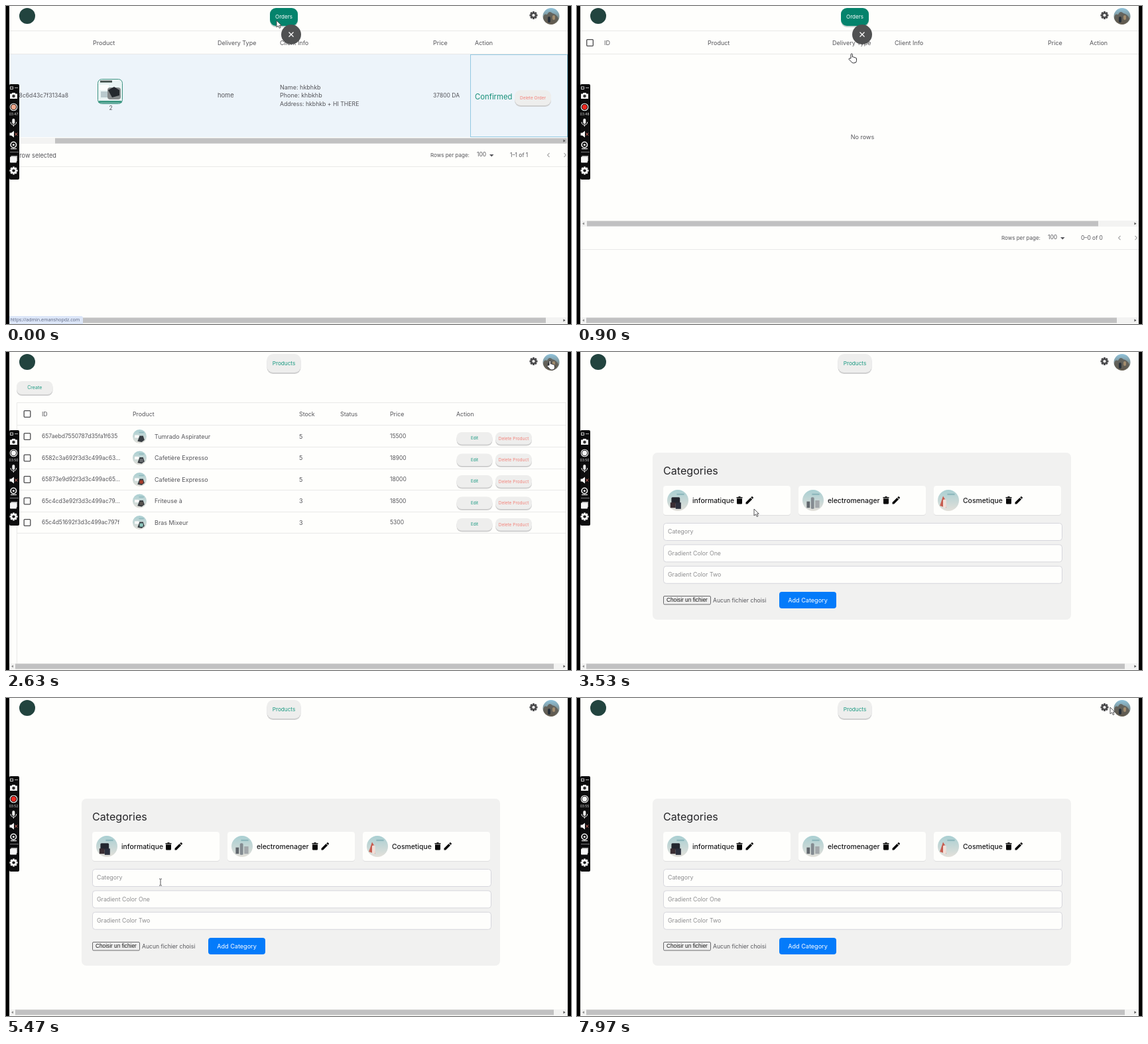
An HTML page that plays this animation: 852x480 px, repeating every 8 s.

```html
<!DOCTYPE html>
<html lang="en">
<head>
<meta charset="utf-8">
<title>Shop admin</title>
<style>
  html, body { margin: 0; width: 100%; height: 100%; overflow: hidden; background: #fefefc; }
  svg { display: block; width: 852px; height: 480px; font-family: Inter, sans-serif; }
</style>
</head>
<body>
<svg id="stage" viewBox="0 0 852 480"></svg>
<script>
const LOOP = 8000;
const PAPER = '#fefefc', INK = '#55555a', LINE = '#e9e9e8', TEAL = '#1c9a82', ROSE = '#f3827a';
const stage = document.getElementById('stage');

// Drawing helpers; text is placed by its vertical middle.
const rect = (x, y, w, h, fill, r = 0, extra = '') =>
  `<rect x="${x}" y="${y}" width="${w}" height="${h}" rx="${r}" fill="${fill}" ${extra}/>`;
const circle = (x, y, r, fill, extra = '') =>
  `<circle cx="${x}" cy="${y}" r="${r}" fill="${fill}" ${extra}/>`;
const path = (d, fill, extra = '') => `<path d="${d}" fill="${fill}" ${extra}/>`;
const stroke = (d, color, width = 1) =>
  path(d, 'none', `stroke="${color}" stroke-width="${width}"`);
const text = (x, y, label, size = 9, fill = INK, extra = '') =>
  `<text x="${x}" y="${y + size * 0.35}" font-size="${size}" fill="${fill}" ${extra}>${label}</text>`;
const centered = (x, y, label, size, fill) => text(x, y, label, size, fill, 'text-anchor="middle"');
const group = (id, body) => `<g id="${id}">${body}</g>`;
const at = (x, y, body) => `<g transform="translate(${x} ${y})">${body}</g>`;
const hLine = (x1, x2, y, color = LINE) => stroke(`M${x1} ${y + 0.5}H${x2}`, color);

const checkbox = (x, y) => rect(x - 4.8, y - 4.8, 9.6, 9.6, 'none', 1, 'stroke="#4a4a4c" stroke-width="1.3"');

function softButton(x, y, w, h, label, size, color, r = 8) {
  return rect(x, y + 2, w, h, '#cfcfcf', r) + rect(x, y, w, h, '#eeeeed', r) +
    centered(x + w / 2, y + h / 2, label, size, color);
}

function gear(x, y, r, fill, hole) {
  let teeth = '';
  for (let i = 0; i < 4; i++)
    teeth += rect(-r, -r * 0.24, r * 2, r * 0.48, fill, 0.5, `transform="rotate(${i * 45})"`);
  return at(x, y, teeth + circle(0, 0, r * 0.75, fill) + circle(0, 0, r * 0.35, hole));
}

// A small round picture: pale backdrop with a caption, and its shapes on a 20-unit disc.
const thumb = (x, y, r, shapes) => at(x, y, `<g transform="scale(${r / 10})">` +
  circle(0, 0, 10, 'url(#pale)') + rect(-1, -6.5, 7, 1.5, '#8fb9bd') + shapes + '</g>');

function scrollbar(y, x1, x2, h = 9) {
  return rect(5, y, 842, h, '#f3f3f2') + rect(x1, y + 0.5, x2 - x1, h - 1, '#c1c1c2') +
    path(`M8 ${y + h / 2}l3 -2v4z`, '#8d8d8d') + path(`M843.500 ${y + h / 2}l-3 -2v4z`, '#505050');
}

function pagination(y, range, lineY) {
  return text(640, y, 'Rows per page:', 8) + text(710, y - 0.5, '100', 8.5) +
    path(`M729 ${y - 1}h6.500l-3.250 3.500z`, INK) + text(760, y, range, 8.4) +
    stroke(`M819.500 ${y - 3}l-3 3l3 3M841.500 ${y - 3}l3 3l-3 3`, '#a9a9a9', 1.1) +
    hLine(5, 847, lineY);
}

function orderHeads(shift) {
  const heads = [['Product', 197], ['Delivery Type', 385], ['Client Info', 479], ['Price', 710], ['Action', 773]];
  return hLine(5, 847, 37) + hLine(5, 847, 72) +
    heads.map(([label, x]) => text(x - shift, 56, label)).join('');
}

const speedDial = rect(398, 5, 42, 27, '#c4d2cf', 9) + rect(398, 3, 42, 27, '#04836c', 9) +
  centered(419, 16.5, 'Orders', 8, '#fff') + circle(430, 43, 15, '#505152') +
  stroke('M426.500 39.500l7 7m0 -7l-7 7', '#fff', 1.3);

function orderPage() {
  const product = rect(138.5, 110.5, 37, 37, '#e9f3f3', 6, 'stroke="#3f9484"') +
    rect(142, 112.5, 18, 3, '#44504d') + rect(140, 119, 15, 8, '#fcfcfc') +
    rect(153, 123, 20, 18, '#85898a', 4) + path('M154 127L163 122L171 127V135L160 138Z', '#25292e') +
    rect(143, 129, 10, 9, '#b9c9cd') + rect(139, 143, 36, 3.5, '#3f9a85', 2);
  return rect(5, 73, 842, 125, '#edf4fa') + orderHeads(66) +
    text(94, 135, '8c6d43c7f3134a8', 8.6, INK, 'text-anchor="end"') + product +
    centered(158, 154, '2', 8.5, INK) + text(319, 135, 'home', 9.3) +
    text(413, 122.5, 'Name: hkbhkb') + text(413, 135, 'Phone: khbkhb') +
    text(413, 148, 'Address: hkbhkb + HI THERE', 8.7) + text(644, 135, '37800 DA', 8.5) +
    rect(700.5, 73.5, 146, 124, 'none', 0, 'stroke="#93c9e2"') +
    text(707, 137, 'Confirmed', 11.3, '#168f79') +
    softButton(767, 127, 55, 23, 'Delete Order', 6.5, ROSE, 9) +
    scrollbar(199, 74, 846) + text(76, 225.5, '1 row selected', 9.2, INK, 'text-anchor="end"') +
    pagination(225, '1–1 of 1', 242) + speedDial + scrollbar(470, 14, 814) +
    path('M5 468H113Q116 468 116 471V480H5Z', '#dce6f8') +
    text(6.5, 474, 'https://admin.emanshopdz.com', 7, '#59627c', 'font-family="Open Sans, sans-serif"');
}

function emptyPage() {
  return orderHeads(0) + checkbox(19.5, 55.5) + text(41, 56, 'ID') + centered(430.5, 198, 'No rows', 9, INK) +
    scrollbar(324, 15, 786) + pagination(350, '0–0 of 0', 367) + speedDial + scrollbar(470, 14, 814);
}

const productsTab = softButton(393.5, 3, 51, 28, 'Products', 8.2, TEAL, 9);

function productPage() {
  const heads = [['ID', 54], ['Product', 191], ['Stock', 442], ['Status', 504], ['Price', 579], ['Action', 679]];
  const rows = [
    ['657aebd7550787d35fa1f635', 'Tumrado Aspirateur', 5, 15500, '#3a3f45'],
    ['6582c3a692f3d3c499ac63…', 'Cafetière Expresso', 5, 18900, '#686d70'],
    ['65873e9d92f3d3c499ac65…', 'Cafetière Expresso', 5, 18000, '#a83d2b'],
    ['65c4cd3e92f3d3c499ac79…', 'Friteuse à', 3, 18500, '#57534f'],
    ['65c4d51692f3d3c499ac797f', 'Bras Mixeur', 3, 5300, '#8cc6bc']
  ];
  const body = rows.map(([id, name, stock, price, accent], i) => {
    const y = 127.5 + i * 32.5;
    const picture = rect(-7, -2, 6, 4, '#fafafa') + path('M-3 7L0 -1H5L7 5L3 8Z', '#383d42') + rect(0, 1, 5, 5, accent, 1);
    return checkbox(32, y) + text(54, y, id, 8.5) + thumb(201.5, y, 10.5, picture) +
      text(224, y, name) + text(442, y, stock) + text(579, y, price, 8.5) +
      softButton(679.5, y - 6.5, 54, 18.5, 'Edit', 6.3, TEAL) +
      softButton(738, y - 6.5, 55, 18.5, 'Delete Product', 6.5, ROSE) +
      hLine(17, 844, Math.round(y + 15.6));
  }).join('');
  return productsTab + softButton(16, 44, 54.5, 20, 'Create', 7, TEAL) +
    stroke('M16.500 470V76.500H844.500V470', LINE) + hLine(17, 844, 110) + checkbox(32, 93.5) +
    heads.map(([label, x]) => text(x, 94, label, 8.8)).join('') +
    group('productRows', body) + scrollbar(470, 14, 826);
}

const trash = (x, y) => path(`M${x - 4.5} ${y - 5}h2.500l1 -1h2l1 1h2.500v1.500h-9zM${x - 4} ${y - 2.8}h8v7q0 1.300 -1.300 1.300h-5.400q-1.300 0 -1.300 -1.300z`, '#080808');
const pencil = (x, y) => path(`M${x - 5.5} ${y + 5.5}v-2.600l7 -7l2.600 2.600l-7 7zM${x + 2.2} ${y - 4.6}l1.200 -1.200q.6 -.5 1.200 0l1.200 1.200q.5 .6 0 1.200l-1.200 1.200z`, '#080808');

function categoryPage() {
  const computer = rect(-6, -3, 8, 6, '#23262f', 1) + rect(-7, 2, 5, 5, '#3a2e33') + rect(-2, 2, 5, 6, '#2b303d');
  const appliances = rect(-6, 1, 3, 6, '#60666c') + rect(-2, -3, 3, 11, '#848b91', 1) + rect(2, 0, 4, 7, '#a3a8ab');
  const makeup = path('M-8 5L-5 -4L-3 -1L-2 7Z', '#c75d50') + rect(-5, -1, 3, 8, '#f1dfd8', 1);
  const cards = [['informatique', 130, 245, computer], ['electromenager', 334, 466, appliances], ['Cosmetique', 538, 651, makeup]];
  const fields = ['Category', 'Gradient Color One', 'Gradient Color Two'];
  return productsTab + rect(114, 152, 631, 252, '#f1f1f0', 7) + text(130, 179, 'Categories', 16.1, '#252528') +
    cards.map(([label, x, icon, picture]) =>
      rect(x, 203, 192, 44, '#dededf', 4) + rect(x, 202, 192, 44, PAPER, 4) +
      thumb(x + 22, 224, 16, picture) +
      text(x + 44, 224, label, 10.4, '#19191b', 'font-weight="500"') +
      trash(icon, 224) + pencil(icon + 15, 224)).join('') +
    fields.map((label, i) => {
      const y = 258.5 + i * 32.4;
      return rect(130.5, y, 601, 26, PAPER, 4, 'stroke="#d6d6dc"') + text(137, y + 12.7, label, 8.8, '#8e8e90');
    }).join('') +
    rect(130.5, 368.5, 71, 12.5, '#efefef', 1.5, 'stroke="#6a6a6c"') +
    text(135, 374.5, 'Choisir un fichier', 8.3, '#161616', 'font-family="Liberation Sans, sans-serif"') +
    text(205, 374.5, 'Aucun fichier choisi', 8.6) +
    rect(305, 362, 86, 25, '#047bfa', 4) + centered(348, 374.5, 'Add Category', 9.1, '#fff') +
    scrollbar(470, 14, 826);
}

function recorder() {
  const white = '#f6f6f6';
  return rect(5, 118, 15, 144, '#0d0d0e', 2) + rect(6.5, 122, 4, 3.5, 'none', 0, `stroke="${white}" stroke-width=".8"`) +
    stroke('M13 123.500h5', '#aaa', 1) +
    path('M6 132.500h2.500l1 -1.500h4l1 1.500h2.500v7.500h-11z', white) + circle(11.5, 136, 2.3, '#333') +
    circle(11.5, 152.5, 5.3, 'none', `stroke="${white}" stroke-width="1.1"`) + circle(11.5, 152.5, 3.7, white, 'id="recordDot"') +
    `<text id="timer" x="11.500" y="165.200" font-size="5" fill="#dcdcdc" text-anchor="middle"></text>` +
    rect(9.3, 170, 4, 8, white, 2) + stroke('M7 175q0 4.500 4.300 4.500t4.300 -4.500M11.300 179v3', white) +
    path('M5.500 191.500h2.500l4 -3v10l-4 -3h-2.500z', white) + stroke('M13.500 191.500l3.500 4m0 -4l-3.500 4', '#e0776d', 1) +
    circle(11.3, 209.5, 4.2, 'none', `stroke="${white}" stroke-width="1.600"`) + circle(11.3, 209.5, 1.6, white) + stroke('M7 215.500h9', white, 1.2) +
    hLine(6, 19, 220, '#77777a') + rect(7.5, 226, 9.5, 8, '#aaa') + rect(6, 227.5, 10, 9, white, 1) +
    gear(11.5, 248.5, 6, white, '#0d0d0e');
}

const avatar = circle(822, 15.5, 12.5, 'url(#sky)') +
  path('M810 18Q811 11 816 13Q819 6 824 11Q830 12 833 19Q831 25 824 27.500Q812 27 810 18Z', '#5c554b', 'opacity=".8"') +
  rect(817, 16, 4, 9, '#28313a', 2) + rect(824, 14, 4, 7, '#a28c6d', 2);

const cursors = group('arrow', path('M0 0V10L2.500 7.800L4.300 11.500L6 10.700L4.300 7.200H7.300Z', '#fff', 'stroke="#424245" stroke-width=".9"')) +
  group('hand', path('M2 7V1.500Q2 0 3.200 0T4.400 1.500V5Q6 4.300 6.800 5.600Q8.300 5 9 6.300Q10.500 6 10.500 8V10.500Q10.500 14 7 14H5.500Q3.500 14 2.500 12L-1 8.500Q-1 6.500 1 7Z', '#fff', 'stroke="#303033" stroke-width="1"')) +
  group('beam', stroke('M-2 -5h1.500l.5 .5l.5 -.5h1.500M0 -4.500v9M-2 5h1.500l.5 -.5l.5 .5h1.500', '#555558'));

stage.innerHTML = `<defs>
    <linearGradient id="pale" x2="0" y2="1"><stop stop-color="#a9cfd2"/><stop offset="1" stop-color="#e3e0da"/></linearGradient>
    <linearGradient id="sky" x2="0" y2="1"><stop stop-color="#8fc3dc"/><stop offset="1" stop-color="#6f6858"/></linearGradient>
  </defs>` + rect(0, 0, 852, 480, PAPER) +
  group('orders', orderPage()) + group('empty', emptyPage()) +
  group('products', productPage()) + group('categories', categoryPage()) +
  circle(32, 15, 12, '#22443f') + gear(795.5, 14, 6, '#4b4b4d', PAPER) + avatar +
  rect(0, 0, 5, 480, '#000') + rect(847, 0, 5, 480, '#000') + recorder() + group('cursor', cursors);

const byId = id => document.getElementById(id);
const show = (id, visible) => byId(id).setAttribute('display', visible ? 'inline' : 'none');

// Pages and pointer shapes switch hard at their start times.
const pages = [[0, 'orders'], [450, 'empty'], [1400, 'products'], [2950, 'categories']];
const pointers = [[0, 'arrow'], [120, 'hand'], [2950, 'arrow'], [5050, 'beam'], [5900, 'arrow']];
const track = [
  [0, 408, 22], [350, 410, 22], [900, 411, 72], [1350, 417, 18], [1700, 430, 20],
  [2500, 817, 13], [2750, 817, 13], [3530, 267, 237], [4050, 330, 372], [4700, 220, 310],
  [5470, 233, 278], [5900, 233, 278], [6970, 74, 72], [7150, 74, 72], [7970, 804, 14], [8000, 804, 14]
];
const current = (steps, t) => steps.filter(([start]) => start <= t).pop()[1];

function pointerAt(t) {
  const i = Math.max(1, track.findIndex(([time]) => time > t));
  const [t0, x0, y0] = track[i - 1], [t1, x1, y1] = track[i];
  const p = (t - t0) / (t1 - t0), ease = p * p * (3 - 2 * p);
  return [x0 + (x1 - x0) * ease, y0 + (y1 - y0) * ease];
}

function render(now) {
  const t = now % LOOP;
  const page = current(pages, t), pointer = current(pointers, t);
  pages.forEach(([, id]) => show(id, id === page));
  ['arrow', 'hand', 'beam'].forEach(id => show(id, id === pointer));
  show('productRows', t >= 1750);
  byId('cursor').setAttribute('transform', `translate(${pointerAt(t)})`);
  byId('timer').textContent = '03:' + Math.floor(47.45 + t / 1000);
  const blink = t % 750;
  byId('recordDot').setAttribute('fill', blink < 30 ? '#f5ab90' : blink < 340 ? '#ee2a22' : '#f6f6f6');
}

const start = performance.now();
function frame() {
  render(performance.now() - start);
  requestAnimationFrame(frame);
}
frame();
</script>
</body>
</html>
```
